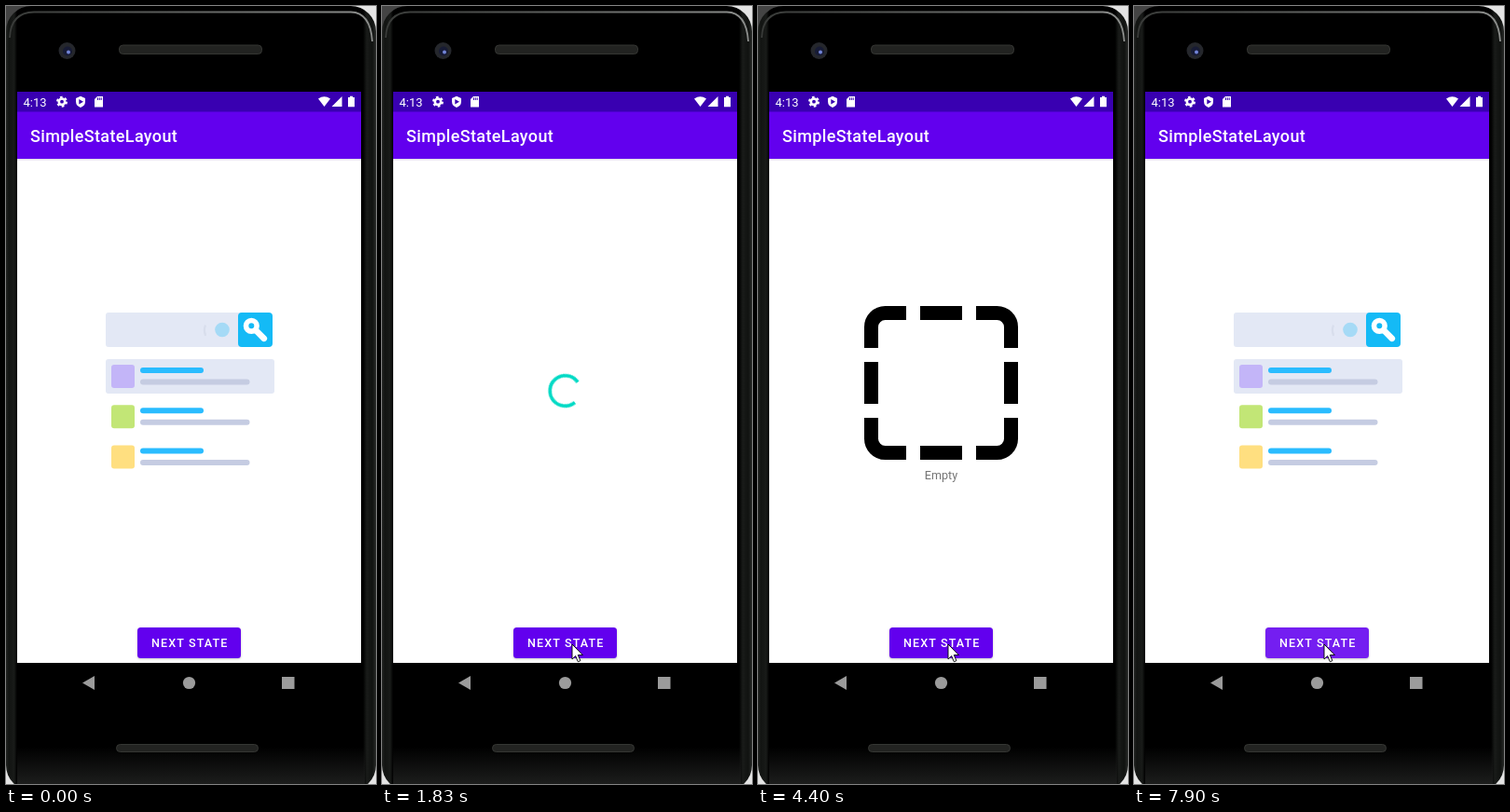
Recreate the animation shown at these times as an HTML page. Size 397 by 835 pixels, loop 8000 ms.

```html
<!DOCTYPE html>
<html lang="en">
<head>
<meta charset="utf-8">
<title>State layout demo</title>
<style>
  html, body { margin: 0; width: 100%; height: 100%; overflow: hidden; background: #e4e4e4; }
  svg { display: block; width: 397px; height: 835px; font-family: Roboto, sans-serif; }

  .state, .cursor, .spin, .arc, .press, .hint, .button { animation: 8s linear infinite; }
  .state { visibility: hidden; animation-timing-function: step-end; }

  .search { animation-name: search; }
  .loading { animation-name: loading; }
  .empty { animation-name: empty; }
  .content { animation-name: content; }
  .error { animation-name: error; }
  @keyframes search { 0%, 95.625%, 100% { visibility: visible } 14.56% { visibility: hidden } }
  @keyframes loading { 0%, 27.5%, 100% { visibility: hidden } 14.56% { visibility: visible } }
  @keyframes empty { 0%, 57.25%, 100% { visibility: hidden } 27.5% { visibility: visible } }
  @keyframes content { 0%, 75.875%, 100% { visibility: hidden } 57.25% { visibility: visible } }
  @keyframes error { 0%, 95.625%, 100% { visibility: hidden } 75.875% { visibility: visible } }

  .hint { animation-name: hint; animation-timing-function: step-end; }
  @keyframes hint { 0%, 50%, 100% { opacity: 0 } 1.5% { opacity: 1 } }

  .button { animation-name: tint; animation-timing-function: step-end; }
  @keyframes tint { 0% { fill: #6200ee } 57.25% { fill: #6505ee } 75.875% { fill: #6a10f0 } 95.625%, 100% { fill: #741ef1 } }

  /* Each press replays the same short ripple, shifted to its own moment. */
  .press { animation-name: ripple; animation-delay: calc(var(--at) - 8s); transform-origin: 204px 686px; opacity: 0; }
  @keyframes ripple {
    0% { transform: scale(.1); opacity: .24 }
    2.2% { transform: scale(1); opacity: .24 }
    4.7%, 100% { transform: scale(1); opacity: 0 }
  }

  .spin { animation-name: spin; transform-origin: 196.5px 413px; }
  @keyframes spin { from { transform: rotate(-370deg) } to { transform: rotate(1466deg) } }
  .arc { animation-name: arc; animation-timing-function: cubic-bezier(.4, 0, .2, 1); }
  @keyframes arc {
    0%, 14.56% { stroke-dasharray: 1 99; stroke-dashoffset: 0 }
    22.875% { stroke-dasharray: 76.5 23.5; stroke-dashoffset: 0 }
    31.2%, 100% { stroke-dasharray: 1 99; stroke-dashoffset: -75.5 }
  }

  .cursor { animation-name: cursor; }
  @keyframes cursor {
    0%, 1.5% { transform: translate(300px, 840px); animation-timing-function: ease-out }
    7.5%, 11.6% { transform: translate(209px, 690px) }
    12.6%, 100% { transform: translate(204px, 685px) }
  }
</style>
</head>
<body>
<svg viewBox="0 0 397 835">
  <defs>
    <linearGradient id="body">
      <stop offset="0" stop-color="#222422"/>
      <stop offset=".008" stop-color="#121412"/>
      <stop offset=".022" stop-color="#191b19"/>
      <stop offset=".03" stop-color="#000"/>
      <stop offset=".965" stop-color="#000"/>
      <stop offset=".975" stop-color="#191b19"/>
      <stop offset=".99" stop-color="#101210"/>
      <stop offset="1" stop-color="#282a28"/>
    </linearGradient>
    <linearGradient id="chin" x2="0" y2="1">
      <stop offset="0" stop-color="#1c1d1c" stop-opacity="0"/>
      <stop offset="1" stop-color="#1c1d1c"/>
    </linearGradient>
    <linearGradient id="rim">
      <stop offset="0" stop-color="#383a38"/>
      <stop offset=".5" stop-color="#626462"/>
      <stop offset="1" stop-color="#8c8e8c"/>
    </linearGradient>
    <clipPath id="buttonShape"><rect x="141" y="667" width="111" height="33" rx="3.5"/></clipPath>
    <filter id="soft" x="-10%" y="-20%" width="120%" height="150%"><feGaussianBlur stdDeviation="1"/></filter>
    <g id="row">
      <rect x="113" width="25" height="25" rx="3"/>
      <rect x="144" y="3" width="68" height="6" rx="3" fill="#2abcff"/>
      <rect x="144" y="15.6" width="117.5" height="6" rx="3" fill="#c5cce2"/>
    </g>
  </defs>

  <!-- Phone -->
  <rect width="30" height="30" fill="#444"/>
  <rect width="397" height="842" rx="27" fill="url(#body)"/>
  <path d="M12 795H385V835H12Z" fill="url(#chin)"/>
  <path d="M4 34Q5 7 30 6.5H370Q391 7 393 38" fill="none" stroke="url(#rim)" stroke-width="1.8"/>
  <g fill="#222321" stroke="#353633">
    <rect x="121.5" y="42" width="153" height="9.5" rx="4"/>
    <rect x="118.5" y="792.5" width="152" height="8" rx="4"/>
  </g>
  <circle cx="65.5" cy="48" r="9" fill="#25272c"/>
  <circle cx="66" cy="48.5" r="5" fill="#171b35"/>
  <circle cx="67" cy="49.5" r="2" fill="#7284d8"/>
  <g fill="#9b9b9b">
    <path d="M82 726.5L95 719V734Z"/>
    <circle cx="196.5" cy="726.5" r="6.6"/>
    <rect x="296" y="720" width="13.5" height="13"/>
  </g>

  <!-- Bars -->
  <rect x="12" y="92" width="369" height="613" fill="#fff"/>
  <rect x="12" y="164" width="369" height="1.5" fill="#e4e1ea"/>
  <rect x="12" y="113" width="369" height="51" fill="#6200ee"/>
  <rect x="12" y="92" width="369" height="21.5" fill="#3900b1"/>
  <g fill="#fff">
    <text x="18.5" y="107.5" font-size="13">4:13</text>
    <circle cx="60" cy="102.7" r="3.2" fill="none" stroke="#fff" stroke-width="2.6"/>
    <circle cx="60" cy="102.7" r="5" fill="none" stroke="#fff" stroke-width="2" stroke-dasharray="2.6 2.636"/>
    <path d="M80 96.7L85 99V102.5Q85 107 80 109Q75 107 75 102.5V99Z"/>
    <path d="M78.3 100L83 102.8L78.3 105.6Z" fill="#3900b1"/>
    <path d="M98 97H104V108.5H95V100Z"/>
    <path d="M98.4 98.3V101M100.3 98.3V101M102.2 98.3V101" stroke="#3900b1"/>
    <path d="M335 99.5Q341.5 94.8 348 99.5L341.5 108Z"/>
    <path d="M360.5 97V108H349.5Z"/>
    <path d="M367 98H369V96.8H372V98H374V108.3H367Z"/>
    <text x="26" y="146" font-size="18" font-weight="500" letter-spacing=".36">SimpleStateLayout</text>
  </g>

  <!-- States -->
  <g class="state search">
    <rect x="107" y="329" width="148" height="37" rx="3" fill="#e3e8f5"/>
    <path d="M213 342Q210.5 348 213 354Q215 355 215 352Q213 348 215 343Z" fill="#d8deec"/>
    <circle class="hint" cx="210.5" cy="348" r="7.7" fill="#d8deec"/>
    <circle cx="232" cy="347.5" r="7.8" fill="#a5daf6"/>
    <rect x="249" y="329" width="37" height="37" rx="4" fill="#14baf6"/>
    <g fill="none" stroke="#fff">
      <circle cx="263.3" cy="343.3" r="5.8" stroke-width="5.6"/>
      <path d="M268 348L276.8 356.8" stroke-width="6.6" stroke-linecap="round"/>
    </g>
    <rect x="107" y="379" width="181" height="37" rx="3" fill="#e3e8f5"/>
    <use href="#row" y="385" fill="#c3b5f8"/>
    <use href="#row" y="428.2" fill="#c2e676"/>
    <use href="#row" y="471.5" fill="#ffdf80"/>
  </g>

  <g class="state loading">
    <g class="spin">
      <circle class="arc" cx="196.5" cy="413" r="16.3" pathLength="100" fill="none" stroke="#03dac5" stroke-width="3.8"/>
    </g>
  </g>

  <g class="state empty">
    <rect x="121.5" y="329.5" width="150" height="150" rx="15" fill="none" stroke="#000" stroke-width="15"/>
    <path d="M166.5 320V489M226.5 320V489M112 374.5H281M112 434.5H281" stroke="#fff" stroke-width="15"/>
    <text x="196.5" y="507.5" font-size="12.57" text-anchor="middle" fill="#757575">Empty</text>
  </g>

  <g class="state content">
    <text x="196.5" y="425" font-size="31.4" text-anchor="middle" fill="#757575">Content View</text>
  </g>

  <g class="state error">
    <circle cx="196.5" cy="404" r="89.7" fill="#d62828"/>
    <path d="M187.5 348H205.5V421H187.5ZM187.5 438H205.5V455H187.5Z" fill="#e6e6e6"/>
    <text x="196.5" y="507.5" font-size="12.57" text-anchor="middle" fill="#757575">App Error</text>
  </g>

  <!-- Button -->
  <rect x="141" y="668" width="111" height="33" rx="3.5" fill="#000" opacity=".22" filter="url(#soft)"/>
  <g clip-path="url(#buttonShape)">
    <rect class="button" x="141" y="667" width="111" height="33" fill="#6200ee"/>
    <g fill="#fff">
      <circle class="press" style="--at:1s" cx="204" cy="686" r="70"/>
      <circle class="press" style="--at:2.06s" cx="204" cy="686" r="70"/>
      <circle class="press" style="--at:3.32s" cx="204" cy="686" r="70"/>
      <circle class="press" style="--at:4.46s" cx="204" cy="686" r="70"/>
      <circle class="press" style="--at:5.94s" cx="204" cy="686" r="70"/>
      <circle class="press" style="--at:7.52s" cx="204" cy="686" r="70"/>
    </g>
  </g>
  <text x="156" y="688.3" font-size="12.57" font-weight="500" letter-spacing="1.12" fill="#fff">NEXT STATE</text>

  <path class="cursor" d="M0 0V16L3.7 12.6L6.3 18.8L8.9 17.7L6.3 11.6H11.4Z" fill="#fff" stroke="#000" stroke-width=".9"/>
</svg>
</body>
</html>
```
